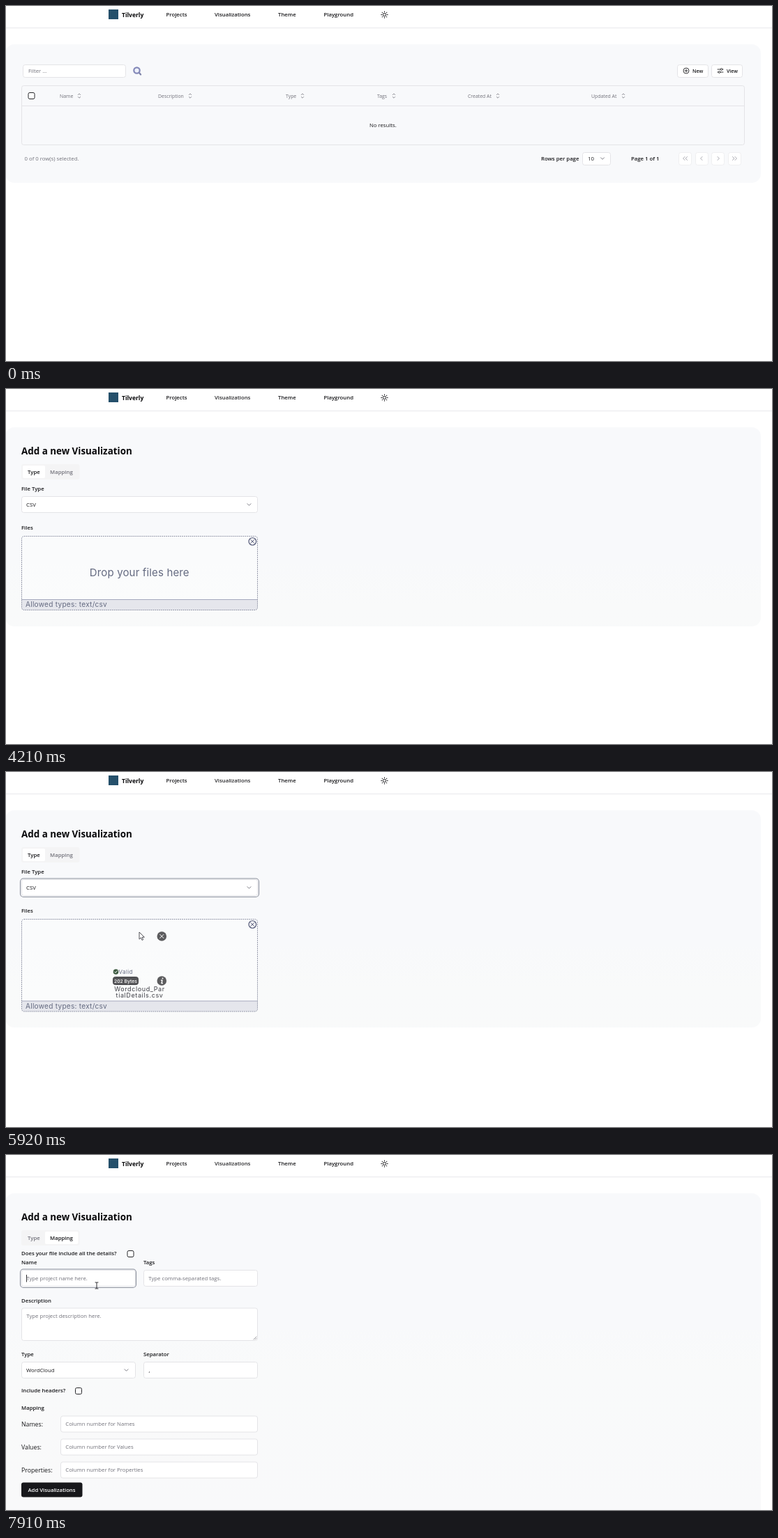
Write an HTML page that moves like this. It is 1098 px wide and 510 px high and loops after 8000 ms.

```html
<!DOCTYPE html>
<html lang="en">
<head>
<meta charset="utf-8">
<title>Add a visualization</title>
<style>
html, body { margin: 0; width: 100%; height: 100%; overflow: hidden; background: #fff; }
svg { display: block; width: 1098px; height: 510px; }
text { font-family: "Open Sans", "Noto Sans", sans-serif; font-size: 7.75px; fill: #18181b; white-space: pre; }
.semi { font-weight: 600; }
.small { font-size: 7px; font-weight: 600; }
.head { font-size: 6.9px; font-weight: 500; fill: #71717a; }
.title { font-size: 13.4px; font-weight: 700; fill: #09090b; }
.brand { font-size: 8.5px; font-weight: 700; fill: #09090b; }
.muted { fill: #71717a; }
.large { font-size: 8.75px; }
.drop, .types, .file, .valid, .bytes { font-family: Inter, "Noto Sans", sans-serif; fill: #646a80; }
.drop { font-size: 15px; letter-spacing: .15px; }
.types { font-size: 10.1px; letter-spacing: .25px; }
.file { font-size: 9px; letter-spacing: .6px; fill: #3f3f46; }
.valid { font-size: 8px; letter-spacing: .4px; }
.bytes { font-size: 6.8px; font-weight: 500; fill: #fff; }
</style>
</head>
<body>
<svg id="stage" viewBox="0 0 1098 510" xmlns="http://www.w3.org/2000/svg"></svg>
<script>
const LOOP = 8000;
const stage = document.getElementById('stage');

// Text is placed by its vertical middle.
const text = (x, mid, str, cls = '', extra = '', drop = 2.75) =>
  `<text x="${x}" y="${mid + drop}" class="${cls}" ${extra}>${str}</text>`;
const box = (x, y, w, h, r = 3, fill = '#fff', stroke = '#e4e4e7', extra = '') =>
  `<rect x="${x + .5}" y="${y + .5}" width="${w - 1}" height="${h - 1}" rx="${r}" fill="${fill}" stroke="${stroke}" ${extra}/>`;
const line = (d, color = '#18181b', width = 1, extra = '') =>
  `<path d="${d}" fill="none" stroke="${color}" stroke-width="${width}" stroke-linecap="round" stroke-linejoin="round" ${extra}/>`;
const circle = (x, y, r, fill, stroke = 'none', width = 1) =>
  `<circle cx="${x}" cy="${y}" r="${r}" fill="${fill}" stroke="${stroke}" stroke-width="${width}"/>`;
const cross = (x, y, s, color, width = 1) => line(`M${x - s} ${y - s}l${2 * s} ${2 * s}m0 ${-2 * s}l${-2 * s} ${2 * s}`, color, width);
const chevron = (x, y) => line(`M${x - 2.5} ${y - 1.2}l2.5 2.5 2.5-2.5`, '#71717a', .9);
const checkbox = (x, y) => box(x, y, 10, 10, 2, '#fff', '#27272a');
const group = (id, body, attrs = '') => `<g id="${id}" ${attrs}>${body}</g>`;

function navbar() {
  const links = [['Projects', 229.5], ['Visualizations', 299], ['Theme', 390], ['Playground', 455.5]];
  const rays = Array.from({ length: 8 }, (_, i) =>
    line('M0-3.9V-4.7', '#18181b', 1, `transform="translate(542.5 12.5) rotate(${i * 45})"`)).join('');
  return '<rect x="147" y="5" width="14" height="14" fill="#25506b"/>' +
    text(166, 12.7, 'Tilverly', 'brand', '', 3) +
    links.map(([s, x]) => text(x, 12.5, s, 'semi', `id="nav${s}"`)).join('') +
    circle(542.5, 12.5, 2.2, 'none', '#18181b') + rays +
    '<path d="M0 31.5H1098" stroke="#e9e9ec"/>';
}

function tablePage() {
  const columns = [['Name', 77, 105], ['Description', 218, 264], ['Type', 401, 425], ['Tags', 532, 556],
    ['Created At', 662, 705], ['Updated At', 839, 885]];
  const sort = x => line(`M${x - 1.7} 127.6l1.7-1.7 1.7 1.7m-3.4 2.9l1.7 1.7 1.7-1.7`, '#71717a', .8);
  const pageButton = (x, d) => box(x, 210, 19, 19, 3, '#fff', '#efeff1') + line(d, '#a1a1aa', .9);
  const left = 'l-2.4 2.5 2.4 2.5', right = 'l2.4 2.5-2.4 2.5';
  return box(24, 84, 148, 19) + text(32, 93.5, 'Filter ...', 'muted') +
    line('M190.5 95.5l2.6 3', '#7d83a8', 2.2) + circle(187.5, 92.5, 4.2, '#eef1fa', '#8388b8', 2.2) +
    box(962, 84, 45, 19, 3, '#fff', '#e4e4e7', 'id="newButton"') + circle(975, 93, 4, 'none', '#27272a', .9) +
    line('M973 93h4m-2-2v4', '#27272a', .9) + text(984, 93.3, 'New', 'small') +
    box(1011, 84, 45, 19) +
    line('M1020 91h4m3 0h1m-8 4h1m3 0h4', '#27272a', .9) + circle(1025.5, 91, 1.4, 'none', '#27272a', .9) +
    circle(1022.5, 95, 1.4, 'none', '#27272a', .9) + text(1033, 93.3, 'View', 'small') +
    box(22, 114, 1037, 86, 3, 'none') + '<path d="M22 143.5H1058" stroke="#e4e4e7"/>' + checkbox(31.5, 124) +
    columns.map(([s, x, icon]) => text(x, 129.2, s, 'head') + sort(icon)).join('') +
    text(540.3, 171.5, 'No results.', '', 'text-anchor="middle"') +
    text(26.5, 219, '0 of 0 row(s) selected.', 'muted') +
    text(767, 219, 'Rows per page', 'semi') + box(826, 210, 41, 19) + text(834, 219, '10') + chevron(855, 219) +
    text(896, 219, 'Page 1 of 1', 'semi') +
    pageButton(964, `M973 216.5${left}M976.5 216.5${left}`) + pageButton(988, `M998 216.5${left}`) +
    pageButton(1011, `M1020 216.5${right}`) + pageButton(1035, `M1041.5 216.5${right}M1045 216.5${right}`);
}

function typePage() {
  const footer = group('footer',
    '<path d="M22.5 302.5h338v12a3 3 0 0 1-3 3h-332a3 3 0 0 1-3-3z" fill="#e5e6ec"/>' +
    '<path d="M22.5 302.5h338" stroke="#a5a9bd"/>' + text(28, 309.5, '', 'types', 'id="allowed"', 3.5));
  const file = group('file',
    circle(223.3, 236, 6.8, '#5c5c5e') + cross(223.3, 236, 2.6, '#fff') +
    circle(157.5, 287, 3.8, '#3d5a41') + line('M155.7 287.1l1.3 1.3 2.4-2.7', '#fff', 1) +
    text(161.5, 287, 'Valid', 'valid', '', 3) +
    box(153, 294, 37, 12, 3, '#555558', '#454548') + text(171.5, 300, '202 Bytes', 'bytes', 'text-anchor="middle"', 2.5) +
    circle(223.3, 300, 6.8, '#5c5c5e') + circle(224.5, 296.6, 1, '#fff') +
    line('M222.5 299.2h1.5l-1 4.3h1.4', '#fff', 1.4) +
    text(191.5, 311.5, 'Wordcloud_Par', 'file', 'text-anchor="middle"', 3) +
    text(191.5, 320.5, 'tialDetails.csv', 'file', 'text-anchor="middle"', 3));
  return text(22, 143, 'File Type', 'semi') + box(22, 154, 339, 24) +
    text(29, 166, '', '', 'id="chosen"') + chevron(348.5, 166) +
    box(20, 152.5, 343, 27.5, 4.5, 'none', '#8d929e', 'id="selectRing" stroke-width="1.1"') +
    text(22, 199, 'Files', 'semi') +
    '<rect id="zoneFill" x="22.5" y="211.5" width="338" rx="3.5"/>' + footer +
    box(22, 211, 339, 107, 3.5, 'none', '#7c8196', 'id="zone" stroke-width=".9" stroke-dasharray="1.7 1.2"') +
    circle(353.3, 219, 5.3, '#fff', '#42486a', 1.1) + cross(353.3, 219, 2.4, '#42486a', 1) +
    text(191.3, 264, 'Drop your files here', 'drop', 'id="prompt" text-anchor="middle"', 5) + file;
}

function mappingPage() {
  const field = (x, y, w, h, str, mid = y + h / 2) => box(x, y, w, h) + text(x + 7.3, mid, str, 'muted');
  const rows = ['Names', 'Values', 'Properties'].map((name, i) => {
    const y = 374.5 + i * 33;
    return text(22, y + 12.3, name + ':', 'large', '', 3.1) + field(78, y, 283, 24, 'Column number for ' + name);
  }).join('');
  return text(22, 141, 'Does your file include all the details?', 'semi') + checkbox(173.5, 137) +
    text(22, 154.5, 'Name', 'semi') + field(22, 165, 164, 24, 'Type project name here.') +
    text(197, 154.5, 'Tags', 'semi') + field(197, 165, 164, 24, 'Type comma-separated tags.') +
    text(22, 209, 'Description', 'semi') + field(22, 219.5, 339, 47.5, 'Type project description here.', 231) +
    line('M355 265l4-4m-1.6 4l1.6-1.6', '#71717a', .7) +
    text(22, 286.5, 'Type', 'semi') + box(22, 297, 164, 24) + text(29, 309, 'WordCloud') + chevron(172.5, 309) +
    text(197, 286.5, 'Separator', 'semi') + box(197, 297, 164, 24) + text(204.5, 309, ',') +
    text(22, 338.5, 'Include headers?', 'semi') + checkbox(99, 334) +
    text(22, 363.5, 'Mapping', 'semi') + rows +
    '<rect x="22" y="470.5" width="87.5" height="21" rx="3" fill="#18181b"/>' +
    text(65.5, 481, 'Add Visualizations', 'semi', 'text-anchor="middle" style="fill:#fff"') +
    group('nameFocus', box(20, 163.5, 167, 27.5, 4.5, 'none', '#8d929e', 'stroke-width="1.1"') +
      '<path d="M29.5 172v10.5" stroke="#18181b" stroke-width=".9"/>');
}

function menu() {
  return box(22, 180, 340, 82, 3, '#fff', '#e4e4e7', 'style="filter:drop-shadow(0 1px 1.5px rgba(0,0,0,.1))"') +
    '<rect id="hover" x="25" width="334" height="19" rx="2" fill="#f4f4f5"/>' +
    line('M30.5 192.3l2 2 4-4.3', '#18181b', 1) +
    ['JSON', 'CSV', 'EXCEL', 'XML'].map((s, i) => text(43.5, 192.5 + i * 19, s)).join('');
}

const cursorShapes =
  group('arrow', '<path d="M0 0V10.2L2.4 8 4 11.6 5.7 10.8 4.1 7.3H7.3Z" fill="#fff" stroke="#3f3f46" stroke-width=".9" stroke-linejoin="round"/>') +
  group('hand', '<path d="M-1 1Q0-.6 1 1V5L5.2 6Q6 6.3 6 7.2L5.2 11.2V12.8H-.6L-4 8.2Q-4.2 6.6-2.5 7.2L-1 8.5Z" fill="#fff" stroke="#3f3f46" stroke-width=".9" stroke-linejoin="round"/>' +
    line('M1.1 5v2m1.6-1.6v1.8m1.5-1.4v1.5', '#3f3f46', .7)) +
  group('beam', line('M-2-4.5H-.7L0-4 .7-4.5H2M0-4V4M-2 4.5H-.7L0 4 .7 4.5H2', '#18181b', .9));

stage.innerHTML =
  `<defs><linearGradient id="tint" gradientUnits="userSpaceOnUse" x1="0" y1="55" x2="0" y2="510">
    <stop offset="0" stop-color="#f8f9fb"/><stop offset=".42" stop-color="#f8f9fb"/>
    <stop offset=".56" stop-color="#f9fafa"/><stop offset="1" stop-color="#f9f9fa"/></linearGradient></defs>` +
  '<rect width="1098" height="510" fill="#fff"/>' + navbar() +
  '<rect id="panel" x="-1" y="55" width="1083" rx="13" fill="url(#tint)"/>' +
  group('table', tablePage()) +
  group('form', text(22, 89, 'Add a new Visualization', 'title', '', 5) +
    '<rect id="tabList" x="22" y="108" width="83.5" height="22" rx="3"/>' +
    '<rect id="pill" y="110" height="18" rx="2" fill="#fff"/>' +
    text(31, 119, 'Type', 'semi', 'id="typeTab"') + text(63, 119, 'Mapping', 'semi', 'id="mappingTab"') +
    group('typeForm', typePage()) + group('mappingForm', mappingPage()) + group('menu', menu())) +
  group('cursor', '<circle id="glow" r="7" cy="-.5" fill="#fbf35a" opacity=".85"/>' + cursorShapes);

const el = id => document.getElementById(id);
const show = (id, on) => { el(id).style.display = on ? '' : 'none'; };
const set = (id, attrs) => { for (const k in attrs) el(id).setAttribute(k, attrs[k]); };
const within = (t, ...spans) => spans.some(([a, b]) => t >= a && t < b);

// Pointer stops: time, x, y
const path = [
  [70, 325, 14], [250, 620, 120], [430, 1040, 440], [500, 1071, 477], [620, 1050, 300], [810, 985, 96],
  [1020, 985, 96], [1120, 840, 110], [1290, 370, 160], [1360, 308.5, 165], [1440, 292, 167], [1700, 279, 168],
  [1850, 279, 168], [2050, 255, 195], [2330, 237, 228], [2440, 237, 228], [2470, 237, 221], [2740, 237, 221],
  [2770, 242, 214], [3180, 242, 214], [3440, 951, 241],
  [5180, 979, 322], [5330, 800, 240], [5500, 520, 178], [5750, 191, 230],
  [6050, 191, 230], [6300, 130, 170], [6500, 79, 125.5],
  [6820, 79, 125.5], [7000, 115, 148], [7180, 170, 162], [7360, 179, 145], [7480, 179, 145], [7570, 130, 187.5]
];

function pointer(t) {
  const i = path.findIndex(p => p[0] > t);
  if (i < 0) return path[path.length - 1].slice(1);
  if (i === 0) return path[0].slice(1);
  const [t0, x0, y0] = path[i - 1], [t1, x1, y1] = path[i];
  const k = (t - t0) / (t1 - t0);
  return [x0 + (x1 - x0) * k, y0 + (y1 - y0) * k];
}

function draw(t) {
  const [x, y] = pointer(t);
  const onForm = t >= 1020, onMapping = t >= 6620;
  const csv = t >= 3100, dropped = t >= 5870, settling = within(t, [6620, 6740]);
  const zoneHeight = dropped ? 132.5 : 106;

  show('table', !onForm);
  show('form', onForm);
  show('typeForm', !onMapping);
  show('mappingForm', onMapping);
  show('menu', within(t, [1840, 3100]));
  set('panel', { height: !onForm ? 199 : onMapping ? 480 : dropped ? 312 : 286 });
  el('navVisualizations').style.fill = t < 140 ? '#18181b' : '#27272a';
  set('newButton', { fill: t > 760 ? '#f4f4f5' : '#fff' });

  show('pill', !settling);
  set('tabList', { fill: settling ? '#f9fafb' : '#f4f4f5', stroke: settling ? '#f1f1f3' : 'none' });
  set('pill', onMapping ? { x: 56, width: 47.5 } : { x: 24, width: 32 });
  el('typeTab').style.fill = !onMapping ? '#18181b' : settling ? '#52525b' : '#71717a';
  el('mappingTab').style.fill = !onMapping ? '#71717a' : settling ? '#3f3f46' : '#18181b';

  el('chosen').textContent = csv ? 'CSV' : 'JSON';
  el('allowed').textContent = 'Allowed types: ' + (csv ? 'text/csv' : 'application/json');
  show('selectRing', within(t, [3100, 4210], [5870, 6620]));
  set('footer', { transform: `translate(0 ${zoneHeight - 106})` });
  set('zone', { height: zoneHeight });
  set('zoneFill', { height: zoneHeight, fill: within(t, [5630, 5870]) ? 'rgba(100,110,140,.1)' : 'rgba(255,255,255,.25)' });
  show('prompt', !dropped);
  show('file', dropped);
  set('hover', { y: 183 + 19 * Math.max(0, Math.min(3, Math.floor((y - 183) / 19))) });

  show('nameFocus', t >= 7760);

  const hand = within(t, [70, 130], [770, 1040], [1340, 1850], [6480, 6880], [7320, 7510]);
  const beam = t >= 7540;
  show('cursor', within(t, [70, 3470], [5180, LOOP]));
  show('hand', hand);
  show('beam', beam);
  show('arrow', !hand && !beam);
  show('glow', within(t, [910, 1020], [1700, 1840], [2830, 3100], [5180, 5850], [6540, 6640], [7660, 7780]));
  set('cursor', { transform: `translate(${x.toFixed(2)} ${y.toFixed(2)})` });
}

const start = performance.now();
function tick() {
  draw((performance.now() - start) % LOOP);
  requestAnimationFrame(tick);
}
tick();
</script>
</body>
</html>
```
